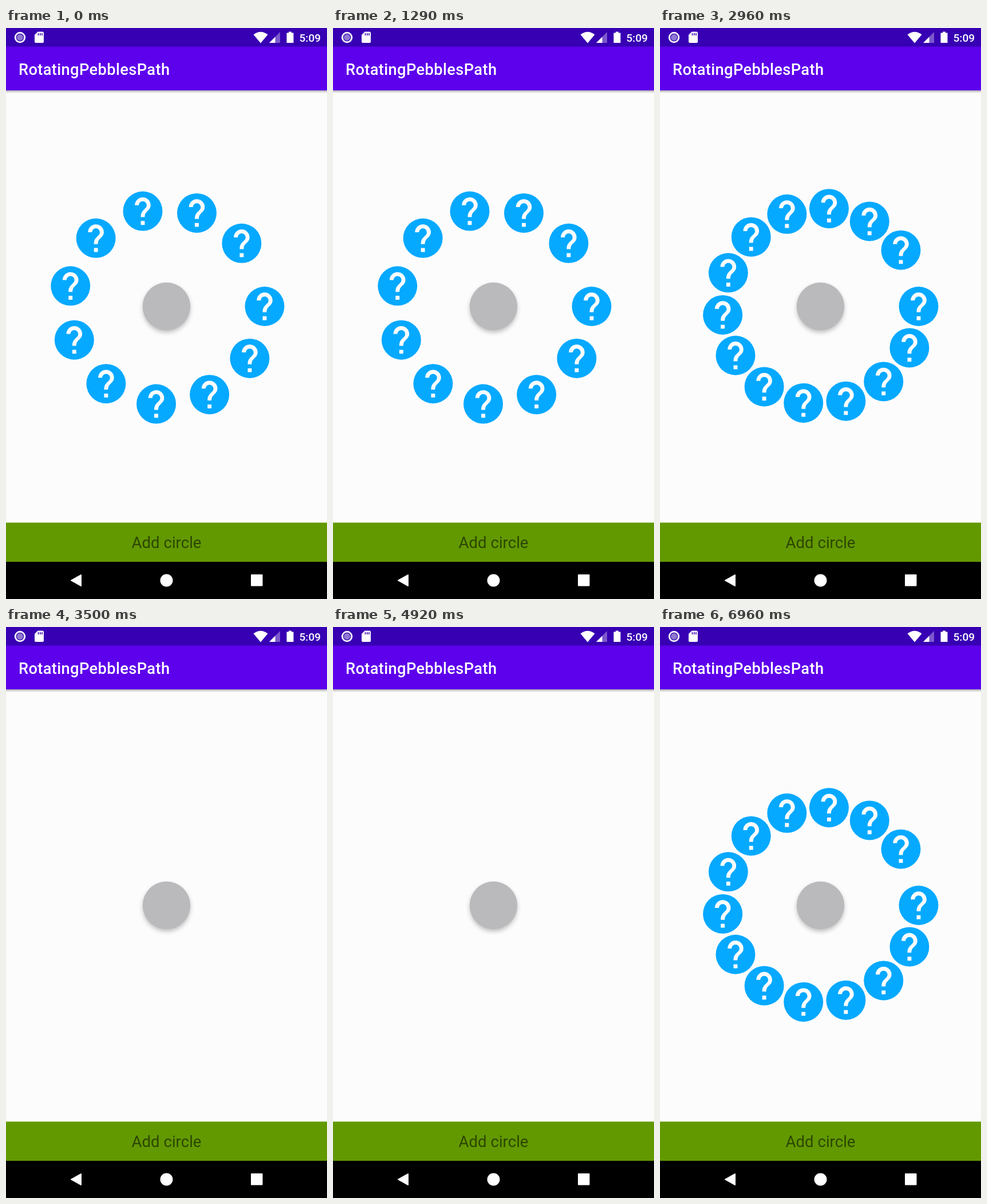
An HTML page that plays this animation: 561 px wide and 998 px high, repeating every 7.17 s.

```html
<!DOCTYPE html>
<html lang="en">
<head>
<meta charset="utf-8">
<title>Bubbles on a ring</title>
<style>
html, body { margin: 0; width: 100%; height: 100%; overflow: hidden; background: #fcfcfd; }
svg { display: block; width: 561px; height: 998px; }
text { font-family: Roboto, sans-serif; fill: #fff; }
.medium { font-weight: 500; }
</style>
</head>
<body>
<svg viewBox="0 0 561 998">
  <defs>
    <linearGradient id="shade" x2="0" y2="1">
      <stop stop-color="#000" stop-opacity=".3"/>
      <stop offset="1" stop-color="#000" stop-opacity="0"/>
    </linearGradient>
    <filter id="blur" x="-30%" y="-30%" width="160%" height="160%">
      <feGaussianBlur stdDeviation="4"/>
    </filter>
    <path id="bubble" fill="#05a9ff" fill-rule="evenodd" transform="scale(3.45) translate(-12 -12)"
      d="M12 2a10 10 0 1 0 0 20a10 10 0 1 0 0-20z
         M13 19h-2v-2h2z
         M15.07 11.25l-.9.92C13.45 12.9 13 13.5 13 15h-2v-.5c0-1.1.45-2.1 1.17-2.83l1.24-1.26
         c.37-.36.59-.86.59-1.41a2 2 0 0 0-4 0H8a4 4 0 0 1 8 0c0 .88-.36 1.68-.93 2.25z"/>
  </defs>

  <rect width="561" height="998" fill="#fcfcfd"/>
  <rect y="109" width="561" height="5" fill="url(#shade)"/>
  <rect y="32" width="561" height="77" fill="#5d00ec"/>
  <rect width="561" height="32.5" fill="#3700b3"/>

  <g fill="#fff">
    <circle cx="24.5" cy="16.5" r="9.7"/>
    <circle cx="24.5" cy="16.5" r="6.2" fill="#8f78d2" stroke="#4a1fb5" stroke-width="1.5"/>
    <path d="M55.5 6.500H64q2 0 2 2V24q0 2-2 2H52q-2 0-2-2V12z"/>
    <path d="M56.500 9v4M59.800 9v4M63 9v4" stroke="#3700b3" stroke-width="1.6"/>
    <path d="M432.500 11.500Q445 2 457.500 11.500L445 26.500z"/>
    <path d="M479 7v19h-19z" opacity=".35"/>
    <path d="M470.500 15.500V26H460z"/>
    <path d="M494 8.500V6.500h5v2h3.500V26H490.500V8.500z"/>
  </g>
  <text class="medium" x="512.500" y="23.500" font-size="19.1">5:09</text>
  <text class="medium" x="22" y="81.500" font-size="27.3" letter-spacing=".34">RotatingPebblesPath</text>

  <g id="ring"></g>
  <circle cx="280.500" cy="490.500" r="41" opacity=".27" filter="url(#blur)"/>
  <circle cx="280.500" cy="486.500" r="41.700" fill="#bababc"/>

  <rect y="864.500" width="561" height="69" fill="#629900"/>
  <text x="280.500" y="909" font-size="27.600" text-anchor="middle" style="fill:#2d4600">Add circle</text>
  <rect y="933" width="561" height="65"/>
  <g fill="#fff" stroke="#fff" stroke-linejoin="round" stroke-width="2">
    <path d="M114 965.500L131 956v19z"/>
    <circle cx="280.500" cy="965.500" r="10"/>
    <path d="M429 956h18.500v18.500H429z"/>
  </g>
</svg>
<script>
const LOOP = 7170, RADIUS = 171.5, MOVE = 300, START_COUNT = 11;
const additions = [1300, 2200, 2700];
// Taps on the centre alternately close and open the ring.
const taps = [3080, 3750, 4450, 5090, 5600, 6380];

const ring = document.getElementById('ring');
const bubbles = Array.from({ length: START_COUNT + additions.length }, () => {
  const use = document.createElementNS('http://www.w3.org/2000/svg', 'use');
  use.setAttribute('href', '#bubble');
  return ring.appendChild(use);
});

const ease = p => (1 - Math.cos(Math.PI * Math.min(Math.max(p, 0), 1))) / 2;

function openness(t) {
  return taps.reduce((open, tap, i) => open + (i % 2 ? 1 : -1) * ease((t - tap) / MOVE), 1);
}

function draw(now) {
  const t = now % LOOP;
  const count = START_COUNT + additions.filter(at => t >= at).length;
  const step = Math.floor(360 / count) * Math.PI / 180;
  const radius = RADIUS * openness(t);
  bubbles.forEach((bubble, i) => {
    const x = 280.5 + radius * Math.cos(i * step);
    const y = 486.5 + radius * Math.sin(i * step);
    bubble.setAttribute('transform', `translate(${x} ${y})`);
    bubble.setAttribute('visibility', i < count ? 'visible' : 'hidden');
  });
}

const start = performance.now();
function tick() {
  draw(performance.now() - start);
  requestAnimationFrame(tick);
}
tick();
</script>
</body>
</html>
```
